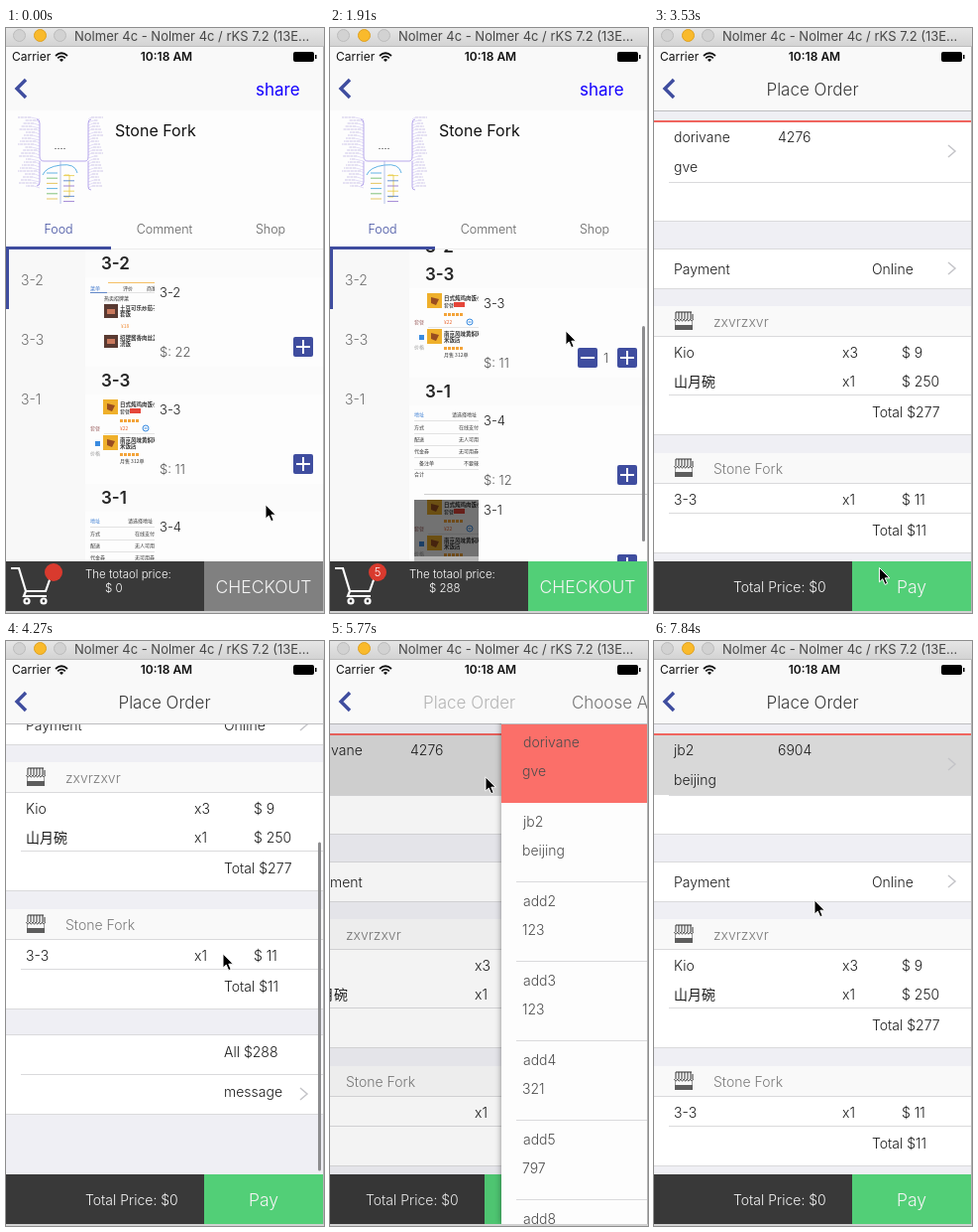
An HTML page that plays this animation: 321 by 589 pixels, repeating every 7990 ms.

```html
<!DOCTYPE html>
<html lang="en">
<head>
<meta charset="utf-8">
<title>Ordering app</title>
<style>
html, body { margin: 0; width: 100%; height: 100%; overflow: hidden; background: #fff; }
#stage { position: relative; width: 321px; height: 589px; overflow: hidden; background: #e4e4e4;
  font: 300 14px/20px Inter, "Noto Sans CJK SC", sans-serif; color: #1c1c1c; }
#stage div, #stage span, #stage svg { position: absolute; }
#stage span { white-space: pre; }
.page { left: 0; top: 0; width: 320px; height: 587px; background: #fdfdfd;
  clip-path: inset(83px 0 0 -8px); }
.over { box-shadow: 0 0 6px rgba(0, 0, 0, .45); }
.dim { left: 0; top: 83px; width: 320px; height: 504px; background: #000; }
#bar { left: 0; top: 0; width: 321px; height: 18px; border-bottom: 1px solid #bdbdbd;
  background: linear-gradient(#e6e6e6, #d3d3d3); }
.light { top: 1px; width: 11px; height: 11px; border-radius: 50%; background: #d2d2d2; border: 1px solid #bcbcbc; }
#nav { left: 0; top: 19px; width: 320px; height: 64px; background: #f9f9f9; overflow: hidden; }
#head { left: 0; top: 0; width: 320px; height: 83px; overflow: hidden; }
.win { font-size: 13px; font-weight: 400; color: #474747; }
.carrier { font-size: 12px; font-weight: 400; color: #111; }
.clock { font-size: 12px; font-weight: 600; color: #111; }
.share { font-size: 17px; font-weight: 400; color: #1400ff; }
.title { font-size: 17px; color: #3a3a3a; }
.shop { font-size: 16px; font-weight: 400; color: #111; }
.tab { font-size: 12.5px; color: #606060; }
.on { color: #3f4d9f; }
.side { font-size: 14px; color: #6f6f6f; }
.sec { font-size: 17px; font-weight: 600; color: #252525; }
.item { font-size: 13px; }
.cost { font-size: 13px; color: #555; }
.sum { font-size: 11.5px; color: #fff; }
.badge { font-size: 11.5px; color: #fff; }
.big { font-size: 17.5px; color: #f4f4f4; }
.pay { color: #f4f4f4; }
.store { color: #7b7b7b; }
.pick { color: #4c4c4c; }
#list { left: 80px; top: 223px; width: 240px; height: 314px; overflow: hidden; }
#rows, #bill { left: 0; top: 0; width: 320px; }
.hd { left: 0; width: 240px; height: 28px; background: #fbfbfb; }
.scroll { left: 315px; width: 3px; border-radius: 2px; background: #8d8d8f; }
.tiny { font: 500 5px "Noto Sans CJK SC", sans-serif; fill: #333; }
.dish { font-size: 5.5px; font-weight: 700; }
</style>
</head>
<body>
<div id="stage"></div>
<svg width="0" height="0" style="position:absolute">
  <defs>
    <symbol id="menu" viewBox="0 0 65 68">
      <rect width="65" height="68" fill="#fdfdfd"/>
      <path d="M18 .5h47" stroke="#f5c065"/>
      <path d="M0 10.5h65" stroke="#e2e2e2"/><path d="M0 10.5h17" stroke="#6288c8"/>
      <g class="tiny"><text x="0" y="8" fill="#4a7fd0">菜单</text><text x="33" y="8">评价</text><text x="57" y="8">商家</text>
      <text x="14" y="18">热卖招牌菜</text><text x="31" y="46" style="fill:#f08b32">¥18</text></g>
      <g class="tiny dish"><text x="30" y="28">土豆可乐炒茄子</text><text x="30" y="34">套饭</text>
      <text x="30" y="58">招牌酱香肉丝盖</text><text x="30" y="64">浇饭</text></g>
      <path d="M14 22h14v14H14zM14 53h14v13H14z" fill="#593a32"/>
      <path d="M17 27h8v5h-8zM17 57h8v5h-8z" fill="#c9785c"/>
    </symbol>
    <symbol id="shops" viewBox="0 0 65 68">
      <rect width="65" height="68" fill="#fdfdfd"/>
      <path d="M13 0h15v15H13zM13 36h15v15H13z" fill="#efb02b"/>
      <path d="M17 4l8 2-3 6-5-2zM17 40l8 2-3 6-5-2z" fill="#994d20"/>
      <g class="tiny dish"><text x="30" y="7">日式炖鸡肉饭小馆</text><text x="30" y="43">南京风味黄焖鸡</text>
      <text x="30" y="49">米饭店</text></g>
      <g class="tiny"><text x="30" y="14">套餐</text><text x="30" y="64">月售 312单</text>
      <text x="30" y="31" style="fill:#e8642c">¥22</text><text x="0" y="31" fill="#a77">套餐</text><text x="0" y="56" fill="#999">价格</text></g>
      <path d="M40 9h11v5H40z" fill="#e5463a"/>
      <path d="M30 21.5h20M30 55.5h20" stroke="#f3a43a" stroke-width="3" stroke-dasharray="3 1"/>
      <path d="M5 42h5v5H5z" fill="#398be0"/>
      <circle cx="56" cy="29" r="3" fill="#fff" stroke="#398be0"/><path d="M54.5 29h3" stroke="#398be0"/>
      <path d="M14 34.5h51" stroke="#e5e5e5"/>
    </symbol>
    <symbol id="form" viewBox="0 0 65 68">
      <rect width="65" height="68" fill="#fdfdfd"/>
      <path d="M0 10.5h65M0 23.5h65M0 35.5h65M0 47.5h65M0 59.5h65" stroke="#e2e2e2"/>
      <g class="tiny"><text x="0" y="6" fill="#3d7fd4">地址</text><text x="38" y="6">请选择地址</text>
      <text x="0" y="19">方式</text><text x="45" y="19">在线支付</text><text x="0" y="31">配送</text>
      <text x="45" y="31">无人可用</text><text x="0" y="43">代金券</text><text x="45" y="43">无可用券</text>
      <text x="5" y="55">备注单</text><text x="50" y="55">不要辣</text><text x="0" y="66">合计</text></g>
    </symbol>
    <symbol id="store" viewBox="0 0 20 20">
      <path d="M2 1h16M2 1v7M5 1v7M8 1v7M11 1v7M14 1v7M17 1v7M19 3v5" stroke="#333" fill="none"/>
      <path d="M.5 8q1.600 4 3.200 0q1.600 4 3.200 0q1.600 4 3.200 0q1.600 4 3.200 0q1.600 4 3.200 0q1.600 4 3 0" fill="none" stroke="#444"/>
      <path d="M1.500 10v8h17v-8" fill="none" stroke="#999"/><path d="M1 14h18v5H1z" fill="#5d5d5d"/>
    </symbol>
  </defs>
</svg>
<script>
const LOOP = 7990, BLUE = '#3f4d9f', GREEN = '#52cf77', DARK = '#393939', LINE = '#dadadc';
const $ = id => document.getElementById(id);

const text = (x, y, s, cls = '', id = '') =>
  `<span class="${cls}" id="${id}" style="left:${x}px;top:${y - 10}px">${s}</span>`;
const mid = (x, y, s, cls = '', id = '') =>
  `<span class="${cls}" id="${id}" style="left:${x - 80}px;width:160px;text-align:center;top:${y - 10}px">${s}</span>`;
const box = (x, y, w, h, color, id = '') =>
  `<div id="${id}" style="left:${x}px;top:${y}px;width:${w}px;height:${h}px;background:${color}"></div>`;
const svg = (x, y, w, h, body) =>
  `<svg width="${w}" height="${h}" style="left:${x}px;top:${y}px">${body}</svg>`;
const use = (x, y, w, h, name) => svg(x, y, w, h, `<use href="#${name}" width="${w}" height="${h}"/>`);
const rule = (y, x = 0) => box(x, y, 320 - x, 1, LINE);
const arrow = y => svg(296, y - 7, 10, 14, '<path d="M1 1l7 6-7 6" fill="none" stroke="#c4c4c8" stroke-width="1.5"/>');
const button = (x, y, plus) => svg(x - 10, y - 10, 20, 20,
  `<rect width="20" height="20" rx="2" fill="${BLUE}"/><path d="M3 10h14${plus ? 'M10 3v14' : ''}" stroke="#fff" stroke-width="2"/>`);

function mindMap() {
  let twigs = '', leaves = '', low = '';
  for (let i = 0; i < 24; i++) {
    const y = 2 + i * 3, a = 15 + i * 5 % 7, b = 76 + i * 3 % 4;
    twigs += `M${a} ${y}L24 ${y + 2}M${b} ${y}L73 ${y + 2}`;
    leaves += `M${a} ${y}H${2 + i * 7 % 9}M${b} ${y}H${88 - i * 5 % 6}`;
  }
  const colors = ['#3aa0dd', '#e8c93f', '#62b35a', '#4777c7', '#e0b93a', '#8a67c9'];
  for (let i = 0; i < 12; i++)
    low += `<path d="M${i % 2 ? 48 : 42} ${58 + i * 2.6}h${i % 2 ? 11 : -11}" stroke="${colors[i % 6]}"/>`;
  return `<g fill="none" stroke-width=".8"><path d="${twigs}" stroke="#c9bdf0" stroke-width=".5"/>
    <path d="${leaves}" stroke="#c0b7e2" stroke-dasharray="3 .6"/>
    <path d="M46 46H28Q24 46 24 41V8Q24 4 21 4M24 46V67Q24 71 21 71M46 46H70Q73 46 73 41V8Q73 4 76 4M73 46V72Q73 75 76 75" stroke="#a592e6"/>
    <path d="M39 33.5h11" stroke="#777" stroke-dasharray="2 1"/>
    <path d="M27 60Q30 52 45 50T62 58" stroke="#3aa0dd"/><path d="M45 46V89" stroke="#8a9fdd" stroke-width=".6"/>
    <path d="M49 60h5v22h-5" stroke="#e8c93f"/>${low}</g>`;
}

// Menu sections: name, top, items
const sections = [
  ['3-2', 0, [['3-2', 22, 'menu']]],
  ['3-3', 118, [['3-3', 11, 'shops']]],
  ['3-1', 236, [['3-4', 12, 'form'], ['3-1', 14, 'shops']]]
];

function menuRows() {
  let out = '', heads = '';
  sections.forEach(([name, top, items], n) => {
    items.forEach(([label, cost, pic], i) => {
      const y = top + 28 + i * 90;
      out += use(5, y + 5, 65, 68, pic) + text(75, y + 15, label, 'item') +
        text(75, y + 75, '$: ' + cost, 'cost') + button(220, y + 70, true);
      if (i) out += box(15, y - 1, 225, 1, '#cfcfcf') + box(5, y + 5, 65, 68, 'rgba(0,0,0,.55)') +
        box(5, y + 62, 65, 11, '#b4b4b4');
    });
    heads += `<div class="hd" id="hd${n}">${text(16, 14, name, 'sec')}</div>`;
  });
  return out + `<div id="count">${button(180, 216, false)}${text(196, 216, '1', 'cost')}</div>` + heads;
}

function shopPage() {
  return svg(10, 88, 90, 90, mindMap()) + text(110, 103, 'Stone Fork', 'shop') +
    mid(53, 203, 'Food', 'tab on') + mid(160, 203, 'Comment', 'tab') + mid(267, 203, 'Shop', 'tab') +
    box(0, 222, 320, 1, '#ececec') + box(0, 220, 106, 3, BLUE) +
    box(0, 223, 80, 314, '#f8f8f8') + box(0, 223, 3, 60, BLUE) +
    ['3-2', '3-3', '3-1'].map((s, i) => text(15, 254 + i * 60, s, 'side')).join('') +
    `<div id="list"><div id="rows">${menuRows()}</div></div><div class="scroll" id="listBar" style="height:217px"></div>` +
    box(0, 537, 200, 50, DARK) + box(200, 537, 120, 50, '#808080', 'go') +
    svg(0, 537, 60, 50, `<g fill="none" stroke="#fff" stroke-width="2.2">
      <path d="M5 7h8l7 23h20l5-14M20 30l-2 5h23"/><circle cx="21" cy="40" r="2.5"/><circle cx="38" cy="40" r="2.5"/></g>
      <circle cx="48" cy="11" r="9" fill="#d93a2e"/>`) +
    mid(48, 548, '', 'badge', 'badge') + text(80, 550, 'The totaol price:', 'sum') +
    text(100, 564, '', 'sum', 'sum') + mid(260, 563, 'CHECKOUT', 'big') + '<div class="dim" id="dim1"></div>';
}

function storeBlock(y, name, rows, total) {
  const end = Math.round(y + 30 + rows.length * 29.5);
  return box(0, y, 320, 30, '#f9f9f9') + box(0, y + 30, 320, end + 10 - y, '#fff') +
    use(20, y + 5, 20, 20, 'store') + text(60, y + 16, name, 'store') + rule(y + 30) +
    rows.map(([a, n, c], i) => text(20, y + 47 + i * 29, a) + text(190, y + 47 + i * 29, n) +
      text(250, y + 47 + i * 29, '$ ' + c)).join('') +
    rule(end, 15) + text(220, end + 18, 'Total $' + total) + rule(end + 40);
}

function orderPage() {
  return `<div id="bill">` +
    box(0, 95, 320, 100, '#fff') + box(0, 95, 320, 60, '#d8d8d8', 'pressed') + rule(155, 15) + rule(194) +
    box(0, 93, 320, 2, '#f0655f') + text(20, 110, '', '', 'who') + text(125, 110, '', '', 'tel') +
    text(20, 140, '', '', 'where') + arrow(124) +
    box(0, 222, 320, 41, '#fff') + rule(222) + rule(262) + text(20, 243, 'Payment') + text(220, 243, 'Online') + arrow(242) +
    storeBlock(280, 'zxvrzxvr', [['Kio', 'x3', 9], ['山月碗', 'x1', 250]], 277) +
    storeBlock(428, 'Stone Fork', [['3-3', 'x1', 11]], 11) +
    box(0, 554, 320, 80, '#fff') + rule(554) + text(220, 572, 'All $288') + rule(594, 15) +
    text(220, 612, 'message') + arrow(614) + rule(634) +
    `</div><div class="scroll" id="billBar" style="height:331px"></div>` +
    box(0, 83, 320, 1, '#bdbdc0') + box(0, 537, 200, 50, DARK) + box(200, 537, 120, 50, GREEN) +
    text(80, 563, 'Total Price: $0', 'pay') + mid(260, 563, 'Pay', 'big') + '<div class="dim" id="dim2"></div>';
}

function choosePage() {
  const people = [['dorivane', 'gve'], ['jb2', 'beijing'], ['add2', 123], ['add3', 123], ['add4', 321], ['add5', 797], ['add8', 123]];
  return box(0, 83, 320, 80, '#fb6f69') + box(0, 163, 320, 80, '#d9d9d9', 'tapped') +
    people.map(([a, b], i) => text(22, 102 + i * 80, a, 'pick') + text(21, 131 + i * 80, b, 'pick') +
      (i ? rule(162 + i * 80, 15) : '')).join('') + box(0, 83, 320, 1, '#bdbdc0');
}

$('stage').innerHTML =
  `<div class="page" id="shop">${shopPage()}</div>
   <div class="page over" id="order" style="background:#efeff4">${orderPage()}</div>
   <div class="page over" id="choose">${choosePage()}</div>
   <div id="nav"></div><div id="head">` +
  svg(8, 50, 14, 22, `<path d="M12 2L3 11l9 9" fill="none" stroke="${BLUE}" stroke-width="3.4"/>`) +
  text(252, 62, 'share', 'share', 'share') + mid(160, 62, 'Place Order', 'title', 'title1') +
  mid(160, 62, 'Choose Address', 'title', 'title2') +
  text(6, 29, 'Carrier', 'carrier') + mid(162, 29, '10:18 AM', 'clock') +
  svg(49, 23, 14, 12, `<g fill="none" stroke="#111" stroke-width="1.7">
    <path d="M1 5Q7-.5 13 5M3.2 7.3Q7 3.8 10.8 7.3"/></g><path d="M5 9q2-2 4 0l-2 2z"/>`) +
  svg(290, 24, 25, 11, '<rect width="21" height="10" rx="2"/><path d="M22 3h1.5v4H22z"/>') +
  `</div><div id="bar"><div class="light" style="left:7px"></div>
   <div class="light" style="left:28px;background:#f9ba2c;border-color:#e0a11e"></div>
   <div class="light" style="left:48px"></div>${text(69, 8, 'Nolmer 4c - Nolmer 4c / rKS 7.2 (13E...', 'win')}</div>` +
  box(320, 19, 1, 570, '#b4b4b4') + box(0, 587, 321, 2, '#d2d2d2') +
  `<svg id="cursor" width="14" height="20" style="left:0;top:0">
   <path d="M1 .8v14.4l3.3-3.1 2.4 5.6 2.5-1.1-2.4-5.4h4.6z" stroke="#fff" stroke-width="1"/></svg>`;

const clamp = v => Math.min(1, Math.max(0, v));
const slide = (t, start) => 1 - (1 - clamp((t - start) / 500)) ** 3;
// Smooth interpolation through [time, ...values] keys
function along(t, keys) {
  const i = keys.findIndex(k => k[0] > t);
  if (i < 0) return keys[keys.length - 1].slice(1);
  if (!i) return keys[0].slice(1);
  const [a, b] = [keys[i - 1], keys[i]], u = (t - a[0]) / (b[0] - a[0]), e = u * u * (3 - 2 * u);
  return a.slice(1).map((v, j) => v + (b[j + 1] - v) * e);
}

const pointer = [[0, 262, 480], [520, 300, 439], [760, 300, 439], [1180, 240, 412], [1920, 238, 305],
  [2060, 238, 305], [2367, 233, 550], [2800, 230, 584], [3450, 230, 584], [3700, 223, 473], [4140, 219, 315],
  [4300, 219, 315], [4850, 200, 440], [5250, 162, 140], [5772, 157, 137], [6360, 144, 205], [6808, 141, 210],
  [7000, 141, 210], [7548, 140, 331], [7844, 162, 261]];
const menuScroll = [[1180, 0], [1920, 107], [2367, 124], [2800, 130]];
const billScroll = [[3700, 0], [4140, 158], [4300, 158], [4900, 0]];

const move = (id, x, y = 0) => $(id).style.transform = `translate(${x}px,${y}px)`;
const fade = (id, v) => $(id).style.opacity = clamp(v);

function draw(now) {
  const t = Math.min(53, Math.floor((now % LOOP + 20) / 147.5)) * 148;
  const p1 = slide(t, 3056), popped = slide(t, 6623), back = t > 6623;
  const p2 = slide(t, 5679) * (1 - popped), added = t > 600;

  move('shop', -96 * p1);
  move('order', Math.round(320 * (1 - p1) - 96 * p2));
  move('choose', Math.round(320 * (1 - p2)));
  $('order').style.visibility = p1 > 0 ? 'visible' : 'hidden';
  $('choose').style.visibility = p2 > 0 ? 'visible' : 'hidden';
  fade('dim1', p1 * .08);
  fade('dim2', p2 * .1);

  fade('share', 1 - 1.4 * p1);
  fade('title1', back ? (popped - .7) * 3.4 : p2 > 0 ? 1 - 1.4 * p2 : (p1 - .18) * 2.5);
  move('title1', 277 * (1 - p1) - 42 * p2);
  fade('title2', back ? 1 - 1.2 * popped : (p2 - .18) * 2.5);
  move('title2', (back ? 235 : 277) * (1 - p2));

  const s = Math.round(along(t, menuScroll)[0]);
  move('rows', 0, -s);
  sections.forEach(([, top], i) => {
    const next = sections[i + 1] ? sections[i + 1][1] - 28 : 999;
    move('hd' + i, 0, Math.max(top, Math.min(s, next)));
  });
  move('listBar', 0, 225 + s * .7);
  fade('listBar', t > 1250 && t < 3300 ? 1 : 0);

  $('count').style.visibility = added ? 'inherit' : 'hidden';
  $('badge').textContent = added ? '5' : '';
  $('sum').textContent = added ? '$ 288' : '$ 0';
  $('go').style.background = added ? GREEN : '#808080';

  const b = Math.round(along(t, billScroll)[0]);
  move('bill', 0, -b);
  move('billBar', 0, 84 + b * .75);
  fade('billBar', t > 3720 && t < 5100 ? 1 : 0);
  $('who').textContent = back ? 'jb2' : 'dorivane';
  $('tel').textContent = back ? '6904' : '4276';
  $('where').textContent = back ? 'beijing' : 'gve';
  fade('pressed', t > 5450 ? 1 : 0);
  fade('tapped', t > 6450 ? 1 : 0);

  const [x, y] = along(t, pointer);
  move('cursor', x - 1, y - 1);
}

function tick() {
  draw(performance.now());
  requestAnimationFrame(tick);
}
tick();
</script>
</body>
</html>
```
